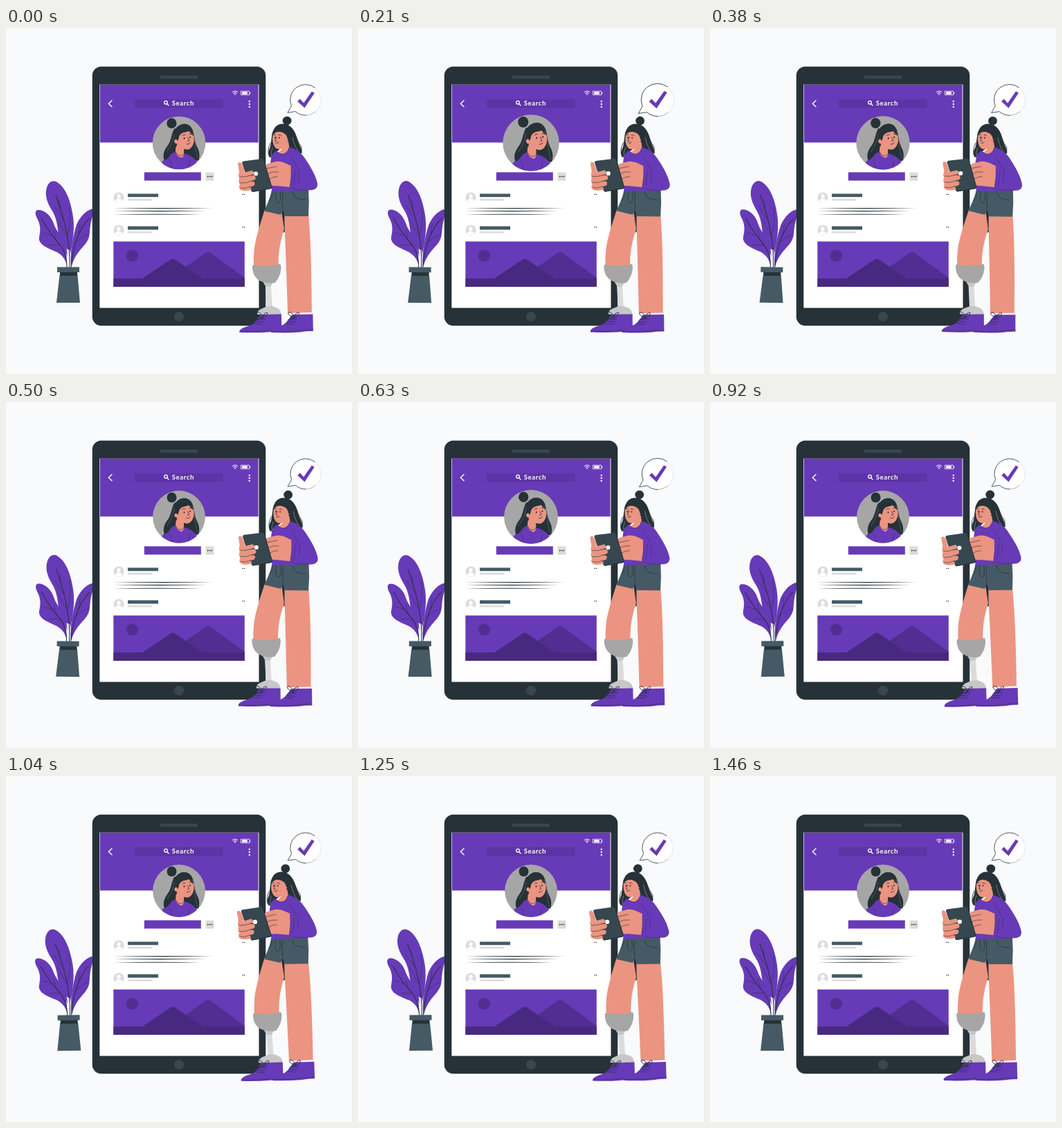
An HTML page with a canvas for the animation above (1.5 s loop, 500 px wide and 500 px high).

```html
<!DOCTYPE html>
<html lang="en">
<head>
<meta charset="utf-8">
<style>
html, body { margin: 0; width: 100%; height: 100%; overflow: hidden; background: #f8fafc; }
canvas { display: block; width: 500px; height: 500px; }
</style>
</head>
<body>
<canvas id="stage"></canvas>
<script>
const canvas = document.getElementById('stage');
const ctx = canvas.getContext('2d');
const ratio = window.devicePixelRatio || 1;
canvas.width = canvas.height = 500 * ratio;

const PURPLE = '#673ab7', DARK = '#263238', SLATE = '#455a64', COAL = '#37474f';
const SKIN = '#eb9481', GREY = '#a6a6a6', LIGHT = '#dbdbdb', WHITE = '#fff', PAPER = '#f8fafc';
const LOOP = 1500, FPS = 24;

function fill(d, color) {
  ctx.fillStyle = color;
  ctx.fill(new Path2D(d));
}
function line(d, color = DARK, width = 0.8) {
  ctx.strokeStyle = color;
  ctx.lineWidth = width;
  ctx.stroke(new Path2D(d));
}
function rect(x, y, w, h, color, radius = 0) {
  ctx.fillStyle = color;
  ctx.beginPath();
  ctx.roundRect(x, y, w, h, radius);
  ctx.fill();
}
function oval(x, y, rx, color, ry = rx) {
  ctx.fillStyle = color;
  ctx.beginPath();
  ctx.ellipse(x, y, rx, ry, 0, 0, Math.PI * 2);
  ctx.fill();
}
function taper(x0, x1, y) {
  const mid = (x0 + x1) / 2;
  fill(`M${x0} ${y}Q${mid} ${y - 1.1} ${x1} ${y}Q${mid} ${y + 1.1} ${x0} ${y}Z`, DARK);
}
function around(x, y, { turn = 0, scale = 1 }, draw) {
  ctx.save();
  ctx.translate(x, y);
  ctx.rotate(turn * Math.PI / 180);
  ctx.scale(scale, scale);
  ctx.translate(-x, -y);
  draw();
  ctx.restore();
}
// Linear interpolation over [position, value] stops.
function tween(stops, p) {
  const i = stops.findIndex(s => s[0] > p);
  const [p0, v0] = stops[i - 1], [p1, v1] = stops[i];
  return v0 + (v1 - v0) * (p - p0) / (p1 - p0);
}
const sway = p => tween([[0, 0], [0.25, 1], [0.75, -1], [1, 0]], p);
const beat = p => tween([[0, 1], [0.1, 1.1], [0.3, 1], [0.4, 1], [0.5, 1.1], [0.6, 1], [1, 1]], p);

function drawPlant() {
  fill('M88 344C86 334 82 329 74 324C60 318 46 313 48 302C50 292 50 286 46 277C42 270 41 264 46 263C54 262 65 270 69 283C73 295 82 301 85 313C87 323 88 334 88 344Z', PURPLE);
  fill('M94 344C92 326 97 300 102 284C108 271 117 262 127 261C129 262 124 273 122 285C120 295 123 302 114 313C104 324 98 332 95 344Z', PURPLE);
  fill('M90 335C88 322 78 312 76 298C74 284 73 274 66 263C58 250 56 240 59 230C62 222 68 219 74 223C87 231 94 252 97 273C100 294 95 318 91 335Z', PURPLE);
  fill('M87.5 319C90 321 92.5 320 92.5 322L93 346H89Q89.5 330 87.5 319Z', PAPER);
  line('M72 242C82 270 93 304 92 346M51 275C60 291 67 301 76 311C85 321 88 332 88 346M120 275C106 289 96 317 94 346', DARK, 1);
  line('M79 261L77 249M84 278Q76 268 69 257M89 299Q95 279 91 259M89 301Q79 287 76 277M67 300Q58 297 53 296M73 308L69 293M78 314Q70 313 62 314M105 298L107 283M99 312Q110 300 119 299', DARK, 0.5);
  fill('M77.5 357H103.5L107 397H73Z', SLATE);
  rect(78, 352, 25, 6, DARK);
  rect(74, 345.5, 32, 7.5, SLATE);
}

function drawAvatar() {
  ctx.save();
  oval(250, 166, 37.9, GREY);
  ctx.beginPath();
  ctx.arc(250, 166, 37.9, 0, Math.PI * 2);
  ctx.clip();
  // Hair behind the shoulders
  fill('M243 146C238 156 239 164 233 171C227 179 227 186 229 191L250 196L278 191C281 183 275 175 273 166C271 156 271 146 262 141Z', DARK);
  fill('M222 206L225 194Q233 184 245 178L257 181Q269 184 275 192L278 206Z', PURPLE);
  fill('M246 166L257 173V182Q256 188 252 187Q246 184 245 178Z', SKIN);
  line('M244.5 178Q251 190 257.5 181M236 190Q240 195 239 204M266 191Q264 196 264 203', '#482980', 0.7);
  // Locks in front
  fill('M242 152C241 166 236 169 231 176C228 182 228 187 230 191C239 186 239 178 247 170L246 160Z', DARK);
  fill('M257 175Q267 175 270 164L272 157Q273 167 277 174Q281 183 278 191Q271 188 267 184Q258 182 257 175Z', DARK);
  oval(239.5, 138, 7, DARK, 7.3);
  fill('M249 156C250 150 256 148 263 148C270 149 272 156 271.5 163C270.5 171 266 176 261 175.5C255 175 250 171 248 167C242.5 168 241.5 161 245.5 159Z', SKIN);
  fill('M243 164C239 152 246 140 256 139C265 138 271 145 271.5 157C269 154 266 152 264 149C262 151 256 150 252 154C249 157 250 162 248 163Q245 158 243 164Z', DARK);
  oval(257.5, 159.5, 0.9, DARK, 1.3);
  oval(266, 158, 0.9, DARK, 1.3);
  line('M254.5 155.5Q256.5 153.5 259 154.5M264.8 153.5Q267 152.5 268.5 154M262.5 158L264.7 163L262.3 163.7M261 168Q264 168.5 266 166', DARK, 0.8);
  line('M269 150Q272 157 273 169T277 189M243 153Q242 166 233 178', GREY, 0.3);
  ctx.restore();
}

function drawPostHead(y) {
  oval(163, y, 7.5, LIGHT);
  oval(163, y - 2, 2.7, WHITE, 3);
  fill(`M158 ${y + 5.5}Q158 ${y + 1.5} 163 ${y + 1.5}T168 ${y + 5.5}Q163 ${y + 8.8} 158 ${y + 5.5}Z`, WHITE);
  rect(176, y - 5.6, 44, 4.9, SLATE);
  rect(176, y + 1.8, 35.3, 2.6, LIGHT);
  for (const x of [342, 344.4]) oval(x, y - 4.4, 0.75, DARK);
}

function drawDevice(scale) {
  rect(124.7, 55.7, 250.6, 374.6, DARK, 13);
  rect(223, 69, 54, 4.2, COAL);
  oval(250, 417, 7, COAL);
  rect(135.3, 81.7, 230.2, 322.9, WHITE);
  rect(136, 82, 228.6, 83.6, PURPLE);

  rect(186, 103, 127.5, 12.5, '#5d34a5');
  ctx.fillStyle = WHITE;
  ctx.font = 'bold 9.6px Lato, sans-serif';
  ctx.letterSpacing = '0.6px';
  ctx.fillText('Search', 239.7, 112.2);
  line('M233.3 107.7a2.3 2.3 0 1 1 -4.6 0a2.3 2.3 0 1 1 4.6 0M232.7 109.5L235 112', WHITE, 1.3);
  line('M153 104.7L148.3 109.2L153 113.7', WHITE, 1.4);
  for (const y of [106, 110, 114]) oval(351.8, y, 1.25, WHITE);
  line('M327.2 92.6Q331 89.6 334.8 92.6M328.8 94.2Q331 92.4 333.2 94.2', WHITE, 1);
  oval(331, 95.7, 0.9, WHITE);
  line('M339.7 91.3H351.8V96.7H339.7Z', WHITE, 0.8);
  rect(341, 92.3, 7.8, 3.4, WHITE);
  rect(352.3, 92.9, 1, 2.3, WHITE);

  around(250, 166, { scale }, drawAvatar);
  rect(199.8, 208.6, 82, 12, PURPLE);
  rect(288.5, 208.6, 12, 12, LIGHT);
  for (const x of [291.7, 294.6, 297.5]) oval(x, 214.6, 0.95, DARK);

  drawPostHead(245);
  taper(155, 299, 260.6);
  taper(155, 289, 264.6);
  taper(155, 282, 269.3);
  drawPostHead(292.2);

  rect(155.3, 308.5, 189.5, 65.5, PURPLE);
  oval(182.4, 329, 8.6, '#522e92');
  fill('M236 362L289 324.3Q292 322.5 295 324.3L344.8 361V362Z', '#522e92');
  fill('M197 362L238 334.5Q241 332.5 244 334.5L284.5 362Z', '#482980');
  rect(155.3, 362, 189.5, 12, '#482980');
}

function drawLegs() {
  fill('M396 262L405 264L403 294L401 296Z', DARK);
  fill('M374 262C367 284 360 306 358.5 322Q357.5 334 358 345H394C393 326 396 309 402 291L398 264Z', SKIN);
  fill('M402.5 268L437 268C440 300 441.5 340 442 412L407.3 413C406 370 404 320 402.5 285Z', SKIN);
  // Prosthesis
  fill('M375 372H383L385 404H377Z', LIGHT);
  fill('M371 366H387L383 373Q379 375 375 373Z', '#c7c7c7');
  fill('M356 344Q357 341 361 343Q379 346 394 341.5Q398 340 397.5 347C397 357 393 363 389 368Q380 370 371 367C362 364 356 357 356 344Z', GREY);
  fill('M363 414C363 409 366 407 371 405Q380 400 388 403Q397 405 398 414Z', '#c7c7c7');
  fill('M407 412L442 411V415H407Z', WHITE);
}

function drawShoe() {
  fill('M337.5 440C336.5 434 347 432 355 429C361 425 364 420 367 415Q372 413 378 414L398 413.5L398.5 438Q388 438 380 439.5Q360 441 337.5 440Z', PURPLE);
  line('M338 438.2Q361 439.2 378 437.4Q388 435.5 398.3 436', DARK, 0.5);
  line('M359 427L370 428M361 424L373 425M364 421L375 421', DARK, 0.7);
  line('M371 419Q358 413 364 410.5Q369 411 371 419Q373 410 378 411.5Q379 416 371 419Q366 419 362 422', DARK, 0.9);
}

function drawHead() {
  fill('M386 149C382 160 384 170 380 176C377 184 381 187 385 188C390 181 392 174 407 171C415 178 419 181 427 181C429 175 423 169 421 161C418 148 411 138 399 138.5C393 139 388 142 386 149Z', DARK);
  oval(406, 134, 6.4, DARK, 6.3);
  line('M382 166Q376 178 381 187M419 157Q423 167 427 172V181', DARK, 0.8);
  fill('M399 166L408 164L410 176Q407 185 398 185L391 180Q399 178 399 172Z', SKIN);
  fill('M385.5 152C391 147 400 147 405 155C410 154 411 160 407 163C406.5 169 402 174 396 175C388.5 176 385.5 169 385 161Z', SKIN);
  fill('M384.2 157C384 146 391 141 400 142C409 143 413 153 409 163L406.5 160C406 154 402 151.5 396 150C391 149.5 388 151 384.2 157Z', DARK);
  oval(388.8, 158.3, 0.9, DARK, 1.2);
  oval(394.8, 158.6, 0.9, DARK, 1.2);
  line('M386.7 154.8L389.3 154.2M393.8 154.6Q396 154 397.5 155.5M391 157.5L388.7 162.7L391 163.3M389.5 166Q391.5 167.5 394 165.3', DARK, 0.8);
  line('M385 173Q382 180 383.5 186M414 158Q416 170 422 178', PAPER, 0.35);
}

function drawHands() {
  // Near forearm and fingers
  fill('M413 200C405 196 398 192 390 193L378 196Q373 199 376 202L377 213L381 225Q384 229 390 228L411 230Z', SKIN);
  line('M377 203L391 200M377 211Q385 207 393 208M380 219Q387 214 392 215', DARK, 0.6);
  // Handheld tablet
  fill('M343 192.5L370 189Q372 189 373 191L384.5 230Q384.5 232 382 232.6L357 237Q355 237 354 235L341 195Q341 193 343 192.5Z', COAL);
  line('M372 190L384.2 231.5L356 236.6', DARK, 0.9);
  oval(361, 210.5, 3.1, WHITE);
  // Far hand
  fill('M335 197C335 193 339 193 341 197C342 202 345 203 344 209L355 206Q359 207 358 211L351 214L358 213Q362 215 360 219L353 222L358 222Q361 225 358 228L352 230Q356 232 354 234Q345 237 339 234Q335 231 338 226Q335 222 337 217Q335 213 337 208Z', SKIN);
  line('M338 215Q346 216 353 213M338 224Q347 225 355 221M339 231Q346 233 353 229', DARK, 0.6);
}

function drawWoman() {
  drawLegs();
  drawShoe();
  ctx.save();
  ctx.translate(45.5, 0);
  drawShoe();
  ctx.restore();

  // Shorts
  fill('M384 233L437 232Q438.5 252 437 272L403 272L400 262L397 270L373.5 264.5C377 254 382 247 384 233Z', SLATE);
  line('M390 236L389.5 247Q390 253 394 253Q397 251 397 244L396 236M400 262Q399 250 400 237M414 237Q416 249 433 248M385 238Q385 246 380 249', DARK, 0.7);

  drawHead();
  // Sweater
  fill('M390 177Q397 184 403 181Q408 178 409 172C418 174 427 180 433 190C441 202 448 214 450 225Q451 232 443 234Q438 234 436 234.5L384 236C385 222 380 216 381 207C382 198 382 188 385 182Z', PURPLE);
  line('M391 178Q398 185 404 181Q408 178 409 173M412 187Q419 197 421 203M424 205Q422 214 423 221M436 234Q422 235 412 231', '#482980', 0.7);
  drawHands();
  fill('M412 199.5Q418 199 421 204L422 232Q416 233 410 229.5Q413 214 412 199.5Z', PURPLE);
  line('M412 200Q413 214 410.5 229.5M418 206L415.5 227', '#482980', 0.7);
}

function drawBubble() {
  fill('M412 112L407 122.3L419 120.5Z', WHITE);
  oval(433.3, 104, 22, WHITE);
  line('M446 86.2A22 22 0 0 0 412.6 112.4L407.2 122.2L418.4 120.4Q424 125.6 433 126', DARK, 0.8);
  line('M433 126A22 22 0 0 0 447 121', DARK, 0.35);
  ctx.setLineDash([1, 2]);
  line('M446 86.2A22 22 0 0 1 447 121', DARK, 0.2);
  ctx.setLineDash([]);
  fill('M421.3 106L424.8 102.6L430.2 108.3L441.8 91.8L445.7 94L431.5 115.5Z', PURPLE);
}

function frame(now) {
  const step = Math.floor((now + 5) * FPS / 1000);
  const phase = ((step * 1000 / FPS + 16) % LOOP) / LOOP;
  const turn = sway(phase), scale = beat(phase);

  ctx.setTransform(ratio, 0, 0, ratio, 0, 0);
  ctx.lineCap = ctx.lineJoin = 'round';
  ctx.fillStyle = PAPER;
  ctx.fillRect(0, 0, 500, 500);
  around(84.5, 309, { turn }, drawPlant);
  drawDevice(scale);
  around(393, 284, { turn }, drawWoman);
  around(432, 104, { scale }, drawBubble);
}

const start = performance.now();
function tick() {
  frame(performance.now() - start);
  requestAnimationFrame(tick);
}
tick();
</script>
</body>
</html>
```
